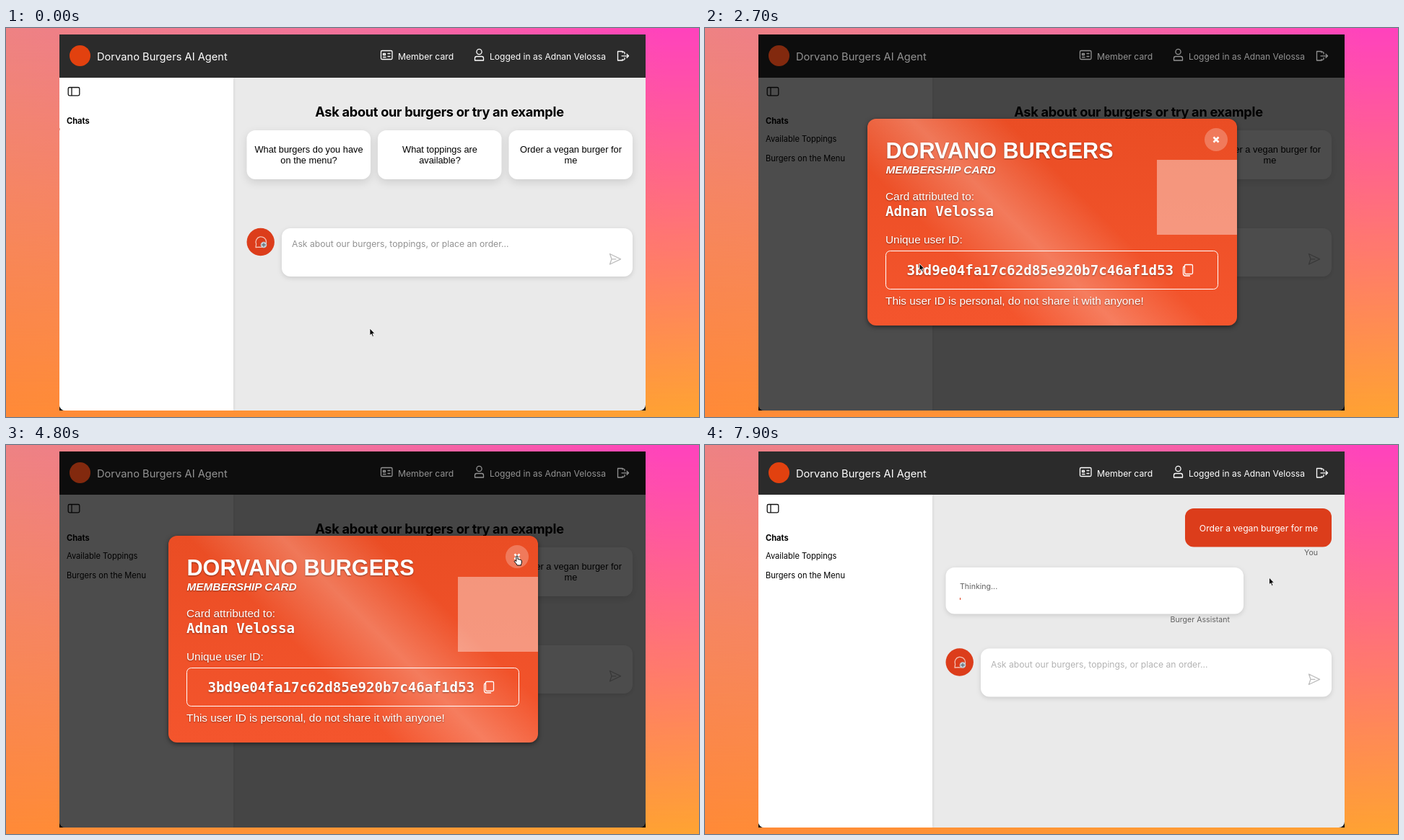
An HTML page that plays this animation: 960x540 px, repeating every 8 s.

```html
<!DOCTYPE html>
<html lang="en">
<head>
<meta charset="utf-8">
<title>Burger agent demo</title>
<style>
  html, body { margin: 0; width: 100%; height: 100%; overflow: hidden; }
  svg { display: block; width: 960px; height: 540px; }
  text { font-family: Inter, sans-serif; font-size: 12.2px; white-space: pre; }
  .arial { font-family: "Liberation Sans", Arial, sans-serif; font-size: 12.8px; }
  .mid { text-anchor: middle; }
  .end { text-anchor: end; }
  .small { font-size: 10.6px; fill: #606060; }
  .side { font-size: 11.1px; }
  .line { fill: none; stroke-width: 1.3; stroke-linejoin: round; stroke-linecap: round; }
  .lift { filter: drop-shadow(0 2px 3px rgba(0, 0, 0, .13)); }
  .float { filter: drop-shadow(0 4px 6px rgba(0, 0, 0, .12)); }
  #card text { fill: #fff; font-size: 15.36px; text-shadow: 0 1px 2px rgba(0, 0, 0, .4); }
  #card .mono { font: bold 19.2px "DejaVu Sans Mono", monospace; }
</style>
</head>
<body>
<svg id="stage" viewBox="0 0 960 540" xmlns="http://www.w3.org/2000/svg"></svg>
<script>
const PERIOD = 8000;
const STEP = 100;
const RED = '#dc3d1b';
const LISTED = 400;       // chat history arrives
const OPENED = 1800;      // member card opens
const CLOSED = 4900;
const ASKED = 5800;       // question is sent
const THINKING = 7000;    // reply switches to its status line

// Pointer moves: start, end, target x, target y
const MOVES = [
  [0, 1700, 571.5, 25],
  [2100, 2700, 297, 327],
  [3000, 3900, 783, 222],
  [3900, 4300, 752, 161],
  [4300, 4700, 708, 154],
  [4800, 5000, 714, 156],
  [5100, 5700, 781.5, 184]
];
const HOME = [504, 417];

const rect = (x, y, w, h, r, fill, more = '') =>
  `<rect x="${x}" y="${y}" width="${w}" height="${h}" rx="${r}" fill="${fill}" ${more}/>`;
const text = (x, y, str, cls = '', more = '') =>
  `<text x="${x}" y="${y}" class="${cls}" ${more}>${str}</text>`;
const stop = (at, color, alpha = 1) =>
  `<stop offset="${at}" stop-color="${color}" stop-opacity="${alpha}"/>`;

const examples = [
  [333.5, 'What burgers do you have', 'on the menu?'],
  [515, 'What toppings are', 'available?'],
  [696.5, 'Order a vegan burger for', 'me']
];

const defs = `<defs>
  <linearGradient id="warm">${stop(0, '#ff8a37')}${stop(1, '#ffa432')}</linearGradient>
  <linearGradient id="pink">${stop(0, '#ee8284')}${stop(.5, '#f2719c')}${stop(.95, '#ff42bd')}</linearGradient>
  <linearGradient id="fade" x2="0" y2="1">${stop(0, '#fff')}${stop(1, '#000')}</linearGradient>
  <mask id="down"><rect width="960" height="540" fill="url(#fade)"/></mask>
  <linearGradient id="base" x2="0" y2="1">${stop(0, '#ea4d24')}${stop(1, '#f4552d')}</linearGradient>
  <linearGradient id="shine" gradientUnits="userSpaceOnUse" x1="-65" y1="191" x2="65" y2="61">
    ${stop(0, '#fff', 0)}${stop(.5, '#fff', .24)}${stop(1, '#fff', 0)}
  </linearGradient>
  <clipPath id="win"><path d="M74 9H886V523a8 8 0 0 1-8 8H82a8 8 0 0 1-8-8Z"/></clipPath>
  <clipPath id="cardClip">${rect(225, 126, 512, 287, 12, '#000')}</clipPath>
</defs>`;

const backdrop = `
  <rect width="960" height="540" fill="url(#warm)"/>
  <rect width="960" height="540" fill="url(#pink)" mask="url(#down)"/>
  ${rect(74, 9, 812, 522, 0, '#111')}
  <g clip-path="url(#win)">
    ${rect(74, 69, 812, 462, 0, '#eaeaea')}
    ${rect(74, 69, 241, 462, 0, '#fff', 'style="filter:drop-shadow(0 0 2px rgba(0,0,0,.12))"')}
    ${rect(74, 9, 812, 60, 0, '#2b2b2b')}
  </g>`;

const sidebar = `
  <path class="line" stroke="#111" d="M88 82.5H100a1.8 1.8 0 0 1 1.8 1.8V92a1.8 1.8 0 0 1-1.8 1.8H88a1.8 1.8 0 0 1-1.8-1.8V84.300a1.800 1.800 0 0 1 1.800-1.800ZM91 82.500V93.800"/>
  ${text(84, 132.5, 'Chats', 'side', 'font-weight="700"')}
  ${rect(74, 139, 0, 3, 0, RED, 'id="listBar"')}
  <g id="list">
    ${text(84, 158, 'Available Toppings', 'side')}
    ${text(84, 185, 'Burgers on the Menu', 'side')}
  </g>`;

const start = `<g id="start">
  ${text(600.5, 122.5, 'Ask about our burgers or try an example', 'mid',
    'style="font-size:18.2px;font-weight:700;letter-spacing:-.3px"')}
  ${examples.map(([x, a, b]) => `
    ${rect(x, 142, 171.5, 68, 12, '#fff', 'class="float example"')}
    ${text(x + 86, 173, a, 'arial mid')}${text(x + 86, 188, b, 'arial mid')}`).join('')}
</g>`;

const chat = `<g id="chat">
  ${rect(665, 88, 203, 53.5, 12, RED)}
  ${text(849, 119.5, 'Order a vegan burger for me', 'end', 'fill="#fff"')}
  ${text(849, 153, 'You', 'end small')}
  ${rect(333.5, 170, 412.5, 42, 12, '#fff', 'id="reply" class="lift"')}
  ${text(727, 223, 'Burger Assistant', 'end small', 'id="author"')}
  ${text(353, 200, 'Thinking...', 'small', 'id="status"')}
  ${rect(353, 189.5, 0, 3, 0, RED, 'id="bar"')}
</g>`;

const input = `<g id="input">
  <circle cx="352.700" cy="297" r="19.200" fill="${RED}"/>
  <path class="line" stroke="#f3c3b6" d="M346 304.500L346.600 300A7.300 7.300 0 1 1 351.500 304.200Z"/>
  <circle cx="357" cy="301" r="4.300" fill="#c3ccd3"/>
  <path class="line" stroke="#65717a" stroke-width="1" d="M354.800 301H359.200M357 298.800V303.200"/>
  ${rect(382, 278, 486, 67, 12, '#fff', 'class="lift"')}
  ${text(396, 304, 'Ask about our burgers, toppings, or place an order...', '', 'id="hint"')}
  <path class="line" stroke="#bdbdbd" d="M836.500 313.500L851.500 320.800L836.500 328L839 320.800ZM839 320.800H845"/>
</g>`;

const header = `<g id="header">
  <circle cx="102.500" cy="38.500" r="14.500" fill="#e2410f"/>
  <g fill="#fff">
    ${text(126, 44.5, 'Dorvano Burgers AI Agent', '', 'style="font-size:14.66px"')}
    ${text(543, 43.500, 'Member card')}
    ${text(670, 43.500, 'Logged in as Adnan Velossa', '', 'style="font-size:12.05px"')}
  </g>
  <g class="line" stroke="#fff">
    ${rect(519.5, 31.5, 15.5, 12, 1.5, 'none')}
    <path d="M522.500 35.500H525.500V37.500H522.500ZM522.500 40.500H526M529 35.500H532M529 39.500H532"/>
    <circle cx="655.500" cy="33" r="3.600"/>
    <path d="M652 39.500H659a2.500 2.500 0 0 1 2.500 2.500V45H649.500V42a2.500 2.500 0 0 1 2.500-2.500Z"/>
    <path d="M854 34V32.500H847.500V45H854V43.500M854 32.500L857 34V36M854 45L857 43.500V41.500M853 38.800H862.500M860 36.300L862.500 38.800L860 41.300"/>
  </g>
</g>`;

const card = `<g id="card">
  ${rect(225, 126, 512, 287, 12, 'url(#base)', 'style="filter:drop-shadow(0 2px 3px rgba(0,0,0,.5))"')}
  <g clip-path="url(#cardClip)">
    ${rect(225, 126, 512, 287, 0, 'url(#shine)')}
    ${rect(626, 183, 116, 104, 0, '#fff', 'opacity=".4"')}
  </g>
  ${text(250.5, 181, 'DORVANO BURGERS', 'arial', 'style="font-size:30.6px;font-weight:700"')}
  ${text(250.5, 202, 'MEMBERSHIP CARD', 'arial', 'style="font-weight:700;font-style:italic"')}
  ${text(250, 239, 'Card attributed to:', 'arial')}
  ${text(250, 261, 'Adnan Velossa', 'mono')}
  ${text(250, 299, 'Unique user ID:', 'arial')}
  ${rect(250.5, 309.5, 460, 53, 6, 'none', 'stroke="#fff"')}
  ${text(279.5, 343, '3bd9e04fa17c62d85e920b7c46af1d53', 'mono')}
  <path class="line" stroke="#fff" stroke-width="1.200" d="M666 328.500H674a1.500 1.500 0 0 1 1.500 1.500V340a1.500 1.500 0 0 1-1.500 1.500H666a1.500 1.500 0 0 1-1.500-1.500V330a1.500 1.500 0 0 1 1.500-1.500ZM664.500 330.500Q662.500 331 662.500 333V341Q662.500 344 665.500 344H671.500"/>
  ${text(250, 384, 'This user ID is personal, do not share it with anyone!', 'arial')}
  <circle cx="708" cy="155" r="16" fill="#fff" opacity=".25"/>
  <path d="M704.500 151.500L711.500 158.500M711.500 151.500L704.500 158.500" stroke="#fff" stroke-width="2.600"/>
</g>`;

const pointer = `<g id="pointer">
  <path id="arrow" d="M0 0V9.800L2.200 7.800L3.700 11.400L5.400 10.700L3.900 7.200H6.900Z" stroke="#fff" stroke-width=".8"/>
  <path id="hand" fill="#fff" stroke="#000" d="M-1.200 7V.9a1.100 1.100 0 0 1 2.200 0V4.500q1.400-.5 2 .5 1.400-.3 1.800.6 1.500-.1 1.500 1.200V9q0 1.500-.8 2.600V13H.2Q-1 10.500-3.600 8q-.6-1 .4-1.500 1-.2 2 1Z"/>
</g>`;

document.getElementById('stage').innerHTML = defs + backdrop + sidebar + start + chat + input +
  rect(504, 21, 129, 35, 4, '#434343', 'id="hover"') +
  rect(74, 9, 812, 522, 0, '#000', 'id="shade" opacity=".7"') +
  header + card + pointer;

const $ = id => document.getElementById(id);
const set = (node, attrs) => {
  for (const k in attrs) node.setAttribute(k, attrs[k]);
};
const show = (id, on) => set($(id), { display: on ? 'inline' : 'none' });
const within = (x, y, l, t, w, h) => x >= l && x <= l + w && y >= t && y <= t + h;

function pointerAt(t) {
  let [x, y] = HOME;
  for (const [from, to, tx, ty] of MOVES) {
    if (t <= from) break;
    const p = Math.min(1, (t - from) / (to - from));
    const k = 1 - (1 - p) ** 2;
    x += (tx - x) * k;
    y += (ty - y) * k;
  }
  return [x, y];
}

// cubic-bezier(.85, 0, .15, 1)
function bezier(x) {
  let lo = 0, hi = 1;
  for (let i = 0; i < 24; i++) {
    const s = (lo + hi) / 2, r = 1 - s;
    if (2.55 * s * r * r + .45 * s * s * r + s ** 3 < x) lo = s; else hi = s;
  }
  return lo * lo * (3 - 2 * lo);
}

// Grows from the left for one second, then shrinks to the right
function loader(id, left, age) {
  const a = (age % 2000 + 2000) % 2000;
  const w = 80 * (a < 1000 ? bezier(a / 1000) : 1 - bezier(a / 1000 - 1));
  set($(id), { x: a < 1000 ? left : left + 80 - w, width: w });
}

function draw(t) {
  const [x, y] = pointerAt(t);
  const modal = t >= OPENED && t < CLOSED;
  const asked = t >= ASKED;
  const thinking = t >= THINKING;

  show('list', t >= LISTED);
  show('listBar', t < LISTED);
  loader('listBar', 74, t + 100);

  show('start', !asked);
  show('chat', asked);
  show('status', thinking);
  const grow = thinking ? 22.5 : 0;
  set($('reply'), { height: 42 + grow });
  set($('author'), { y: 223 + grow });
  set($('bar'), { y: 189.5 + grow });
  if (asked) loader('bar', 353, t - (thinking ? 5750 : Math.min(t, 5832)));
  set($('input'), { transform: `translate(0 ${asked ? grow - 18 : 0})` });
  set($('hint'), { fill: asked ? '#b3b3b3' : '#929292' });

  const onMember = t < OPENED + STEP && within(x, y, 504, 21, 129, 35);
  let hand = onMember || modal && Math.hypot(x - 708, y - 155) < 16;
  document.querySelectorAll('.example').forEach((box, i) => {
    const over = !modal && !asked && within(x, y, examples[i][0], 142, 171.5, 68);
    set(box, { stroke: over ? '#e0a99c' : 'none', 'stroke-width': 1.5 });
    hand = hand || over;
  });
  show('hover', onMember);
  show('shade', modal);
  show('card', modal);
  set($('header'), { opacity: modal ? .55 : 1 });
  set($('shine'), { gradientTransform: `translate(${285 + (x - 297) * .23} 0)` });

  set($('pointer'), { transform: `translate(${x} ${y})` });
  show('hand', hand);
  show('arrow', !hand);
}

function tick() {
  const t = performance.now() % PERIOD;
  draw(Math.floor(t / STEP) * STEP);
  requestAnimationFrame(tick);
}
tick();
</script>
</body>
</html>
```
